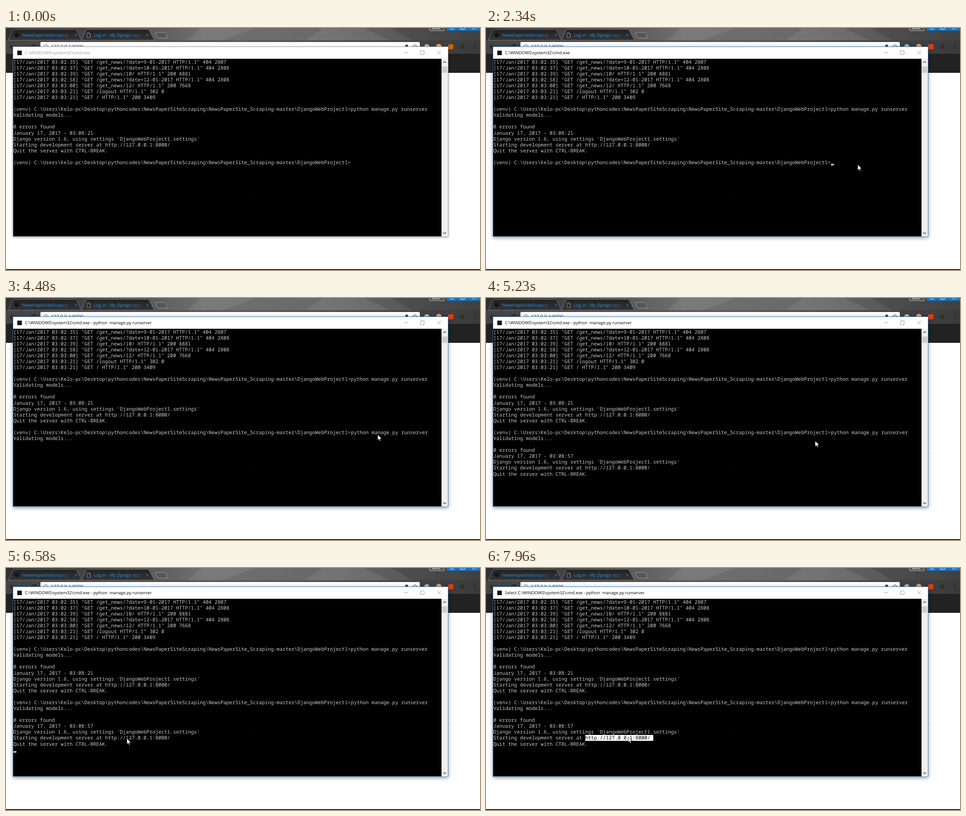
These frames come from a looping animation (1047x535 px, 8000 ms). An HTML page:

```html
<!DOCTYPE html>
<html lang="en">
<head>
<meta charset="utf-8">
<title>Starting the development server</title>
<style>
html, body { margin: 0; width: 100%; height: 100%; overflow: hidden; background: #fff; }
svg { display: block; width: 1047px; height: 535px; }
text { font-family: "Open Sans", "Noto Sans", sans-serif; font-size: 9.4px; text-rendering: geometricPrecision; }
#console text { font-family: "Noto Sans Mono", monospace; font-size: 10.9px; fill: #c8c8c8; white-space: pre; }
#console .inverse text { fill: #000; }
.tab { fill: url(#tabFill); stroke: #8a8a8a; stroke-width: .8; }
.glyph { fill: none; stroke: #999; stroke-width: 1; }
.active .glyph { stroke: #000; }

.idle, .active, .typed, .checking, .serving, .cell, .word,
.plain, .running, .selecting, #caret, #pointer { animation: 8s step-end infinite; }
.idle { animation-name: idle; }
.active { animation-name: active; }
.plain { animation-name: plain; }
.running { animation-name: running; }
.selecting { animation-name: selecting; }
.typed { animation-name: typed; }
.checking { animation-name: checking; }
.serving { animation-name: serving; }
.cell { animation-name: cell; }
.word { animation-name: word; }
#caret { animation-name: caret; }
#pointer { animation-name: pointer; }

@keyframes idle { 0% { opacity: 1 } 22.375%, 100% { opacity: 0 } }
@keyframes active { 0% { opacity: 0 } 22.375%, 100% { opacity: 1 } }
@keyframes plain { 0% { opacity: 1 } 47.875%, 100% { opacity: 0 } }
@keyframes running { 0% { opacity: 0 } 47.875% { opacity: 1 } 88.625%, 100% { opacity: 0 } }
@keyframes selecting { 0% { opacity: 0 } 88.625%, 100% { opacity: 1 } }
@keyframes typed { 0% { opacity: 0 } 30.375%, 100% { opacity: 1 } }
@keyframes checking { 0% { opacity: 0 } 56%, 100% { opacity: 1 } }
@keyframes serving { 0% { opacity: 0 } 57.25%, 100% { opacity: 1 } }
@keyframes cell { 0% { opacity: 0 } 88.625% { opacity: 1 } 91.5%, 100% { opacity: 0 } }
@keyframes word { 0% { opacity: 0 } 91.5%, 100% { opacity: 1 } }
@keyframes caret {
  0%, 30.375%, 41.25%, 56%, 73.125%, 86%, 99.5%, 100% { transform: translate(-99px, 0) }
  29.25% { transform: translate(762px, 300.2px) }
  34.5% { transform: translate(932px, 300.2px) }
  54.625% { transform: translate(16.3px, 313.3px) }
  66.625%, 79.625%, 92.625% { transform: translate(16.3px, 404.8px) }
}
@keyframes pointer {
  0% { transform: translate(-99px, 0) }
  5% { transform: translate(827px, 400px) }
  6.375% { transform: translate(811px, 384px) }
  9.125% { transform: translate(768px, 325px) }
  10.5% { transform: translate(743px, 297px) }
  13.25% { transform: translate(696px, 294px) }
  14.5% { transform: translate(679px, 295px) }
  17.125% { transform: translate(716px, 297px) }
  18.5% { transform: translate(788px, 301px) }
  19.75% { transform: translate(821px, 302px) }
  65.375% { transform: translate(727px, 316px) }
  66.625% { transform: translate(590px, 338px) }
  68% { transform: translate(450px, 358px) }
  69.25% { transform: translate(350px, 371px) }
  70.5% { transform: translate(307px, 376px) }
  73.125% { transform: translate(300px, 375px) }
  74.375% { transform: translate(291px, 373px) }
  75.75% { transform: translate(283px, 372px) }
  77% { transform: translate(277px, 372px) }
  78.375% { transform: translate(272px, 374px) }
  79.625% { transform: translate(269px, 375px) }
  81% { transform: translate(268px, 376px) }
  82.25% { transform: translate(267px, 377px) }
  83.375% { transform: translate(276px, 376px) }
  84.625% { transform: translate(292px, 375px) }
  86% { transform: translate(306px, 374px) }
  87.25%, 100% { transform: translate(314px, 373px) }
}
</style>
</head>
<body>
<svg viewBox="0 0 1047 535">
  <defs>
    <linearGradient id="theme">
      <stop offset="0" stop-color="#303030"/>
      <stop offset=".2" stop-color="#484848"/>
      <stop offset=".42" stop-color="#707070"/>
      <stop offset=".7" stop-color="#686868"/>
      <stop offset="1" stop-color="#484848"/>
    </linearGradient>
    <linearGradient id="bar">
      <stop offset="0" stop-color="#444"/>
      <stop offset=".5" stop-color="#5c5c5c"/>
      <stop offset="1" stop-color="#3a3a3a"/>
    </linearGradient>
    <linearGradient id="tabFill" x2="0" y2="1">
      <stop offset="0" stop-color="#222"/>
      <stop offset="1" stop-color="#343434"/>
    </linearGradient>
    <linearGradient id="fade1" gradientUnits="userSpaceOnUse" x1="115" x2="144">
      <stop offset="0" stop-color="#2492f0"/>
      <stop offset="1" stop-color="#2492f0" stop-opacity=".25"/>
    </linearGradient>
    <linearGradient id="fade2" gradientUnits="userSpaceOnUse" x1="272" x2="304">
      <stop offset="0" stop-color="#2492f0"/>
      <stop offset="1" stop-color="#2492f0" stop-opacity=".2"/>
    </linearGradient>
    <g id="controls" class="glyph">
      <path d="M879 54.5h8M915.5 50.5h8v8h-8zM953 50.5l8 8m0-8l-8 8"/>
    </g>
  </defs>

  <!-- Browser -->
  <rect width="1047" height="535" fill="#fff"/>
  <rect width="1047" height="28" fill="url(#theme)"/>
  <path d="M430 0h120l-75 28h-75zM700 0h90l60 28H660z" fill="#fff" opacity=".07"/>
  <path d="M850 0h197v28H900z" fill="#000" opacity=".12"/>
  <rect y="27" width="1047" height="30" fill="url(#bar)"/>
  <path class="tab" d="M5 27L15 5q1-2 3-2H153q2 0 3 2l11 22z"/>
  <path class="tab" d="M167 27l10-22q1-2 3-2H313q2 0 3 2l12 22z"/>
  <path d="M330 10h20q2 0 3 2l4 10h-20q-2 0-3-2z" fill="#555" stroke="#aaa" stroke-width=".8"/>
  <circle cx="24" cy="15.5" r="5" fill="#151515"/>
  <path d="M179 10.500h4.500l3 3v7.500h-7.500zM183.500 10.500v3h3" fill="none" stroke="#aaa" stroke-width=".8"/>
  <text x="36" y="19" style="font-size:9.2px" fill="url(#fade1)">NewsPaperSiteScraping</text>
  <text x="194" y="19" style="font-size:9.6px" fill="url(#fade2)">Log in - My Django App</text>
  <path d="M152 13l5 5m0-5l-5 5M309.500 13l5 5m0-5l-5 5" stroke="#2492f0" fill="none"/>
  <path d="M20 41.500H9m5-5l-5 5 5 5M64 38a5 5 0 1 0 2 5m0-7v3h-4" fill="none" stroke="#1c1c1c" stroke-width="1.4"/>
  <rect x="76" y="31" width="838" height="22" rx="2" fill="#fff"/>
  <circle cx="88" cy="41.500" r="4.500" fill="none" stroke="#555"/>
  <path d="M88 39v1" stroke="#555"/>
  <text x="99" y="45" style="font-size:10.600px" fill="#333">127.0.0.1:8000</text>
  <path d="M882 37h6v5h-6z" fill="#444"/>
  <path d="M903.500 36l1.500 3.500 4 .3-3 2.700h-5l-3-2.700 4-.3z" fill="none" stroke="#555"/>
  <circle cx="929.500" cy="41" r="5.500" fill="#b5b5b5"/>
  <circle cx="956" cy="41" r="6" fill="#e0a070"/>
  <g class="idle"><rect x="977" y="36" width="11" height="11" fill="#c4680c"/></g>
  <g class="active"><rect x="977" y="36" width="11" height="11" fill="#e23e12"/></g>
  <circle cx="1008" cy="41.500" r="5" fill="#303030"/>
  <path d="M1035 37v2m0 2v2m0 2v2" stroke="#161616" stroke-width="2"/>
  <path d="M935.500 0v4q0 2 2 2h29q2 0 2-2V0" fill="#555" stroke="#bbb"/>
  <text x="941" y="3" fill="#fff">kelo</text>
  <path d="M974 0h22v6h-22zM997 0h24v6h-24zM1022 0h25v6h-25z" fill="#1577c8"/>
  <path d="M981 2.500h8M1004.500 0v3h8V0M1030 3.500l3-3m2 0l3 3" fill="none" stroke="#fff"/>
  <rect y="57" width="1047" height="42" fill="#222"/>
  <rect y="98" width="1047" height="1" fill="#090909"/>
  <rect x="60" y="344" width="931" height="1" fill="#eee"/>
  <rect y="533" width="1047" height="2" fill="#1c1c1c"/>

  <!-- Console window -->
  <g class="idle">
    <rect x="15.500" y="41.500" width="961" height="419.500" fill="#fff" stroke="#aaa" style="filter:drop-shadow(0 1px 2.500px rgba(0,0,0,.4))"/>
  </g>
  <g class="active">
    <rect x="15.500" y="41.500" width="961" height="419.500" fill="#fff" stroke="#3c86c8" style="filter:drop-shadow(0 2px 4px rgba(0,0,0,.45))"/>
  </g>
  <rect x="25" y="50" width="10" height="10" fill="#111"/>
  <g class="idle">
    <use href="#controls"/>
    <text x="42" y="58" fill="#999">C:\WINDOWS\system32\cmd.exe</text>
  </g>
  <g class="active">
    <use href="#controls"/>
    <text class="plain" x="42" y="58">C:\WINDOWS\system32\cmd.exe</text>
    <text class="running" x="42" y="58">C:\WINDOWS\system32\cmd.exe - python&#160; manage.py runserver</text>
    <text class="selecting" x="42" y="58">Select C:\WINDOWS\system32\cmd.exe - python&#160; manage.py runserver</text>
  </g>
  <rect x="16" y="68" width="946" height="392.500" fill="#000"/>
  <rect x="962" y="68" width="14" height="392.500" fill="#f0f0f0"/>
  <rect x="963" y="85" width="12" height="14" fill="#cdcdcd"/>
  <path d="M966 77l3-3 3 3M966 452l3 3 3-3" fill="none" stroke="#444" stroke-width="1.300"/>
  <rect x="542" y="368" width="1" height="1" fill="#777"/>
  <g id="console"></g>
  <rect id="caret" width="6.500" height="3.500" fill="#ccc"/>
  <path id="pointer" d="M0 0V12.500L2.900 9.800 5 14.200 6.900 13.400 4.900 9H9Z" fill="#fff" stroke="#000" stroke-width=".7"/>
</svg>

<script>
const NS = "http://www.w3.org/2000/svg";
const LEFT = 16.3, TOP = 68.2, CELL_W = 6.54, CELL_H = 13.08, BASELINE = 10.4;
const consoleView = document.getElementById("console");

function add(parent, tag, attrs, content = "") {
  const el = document.createElementNS(NS, tag);
  for (const key in attrs) el.setAttribute(key, attrs[key]);
  el.textContent = content;
  return parent.appendChild(el);
}

// Prints lines on the character grid, starting at the given row and column.
function print(row, col, lines, className = "") {
  const group = add(consoleView, "g", { class: className });
  lines.forEach((line, i) => {
    const x = LEFT + col * CELL_W, y = TOP + (row + i) * CELL_H;
    if (className.includes("inverse"))
      add(group, "rect", { x, y, width: line.length * CELL_W, height: CELL_H, fill: "#fff" });
    if (line) add(group, "text", { x, y: y + BASELINE }, line);
  });
}

const prompt = "(venv) C:\\Users\\Kelo-pc\\Desktop\\pythoncodes\\NewsPaperSiteScraping" +
  "\\NewsPaperSite_Scraping-master\\DjangoWebProject1>";
const command = "python manage.py runserver";
const checking = "Validating models...";
const url = "http://127.0.0.1:8000/ ";
const lead = "Starting development server at ";
const banner = time => [
  "0 errors found",
  "January 17, 2017 - " + time,
  "Django version 1.6, using settings 'DjangoWebProject1.settings'",
  lead + url,
  "Quit the server with CTRL-BREAK."
];
const log = [
  ["02:35", "/get_news/?date=9-01-2017", "404 2807"],
  ["02:37", "/get_news/?date=10-01-2017", "404 2808"],
  ["02:39", "/get_news/10/", "200 8881"],
  ["02:58", "/get_news/?date=12-01-2017", "404 2808"],
  ["03:00", "/get_news/12/", "200 7668"],
  ["03:21", "/logout", "302 0"],
  ["03:21", "/", "200 3409"]
].map(([time, path, result]) => `[17/Jan/2017 03:${time}] "GET ${path} HTTP/1.1" ${result}`);

print(0, 0, [...log, "", prompt + command, checking, "", ...banner("03:08:21"), "", prompt]);
print(17, prompt.length, [command], "typed");
print(18, 0, [checking], "checking");
print(20, 0, banner("03:08:57"), "serving");
print(23, lead.length + 14, [url[14]], "inverse cell");
print(23, lead.length, [url], "inverse word");
</script>
</body>
</html>
```
